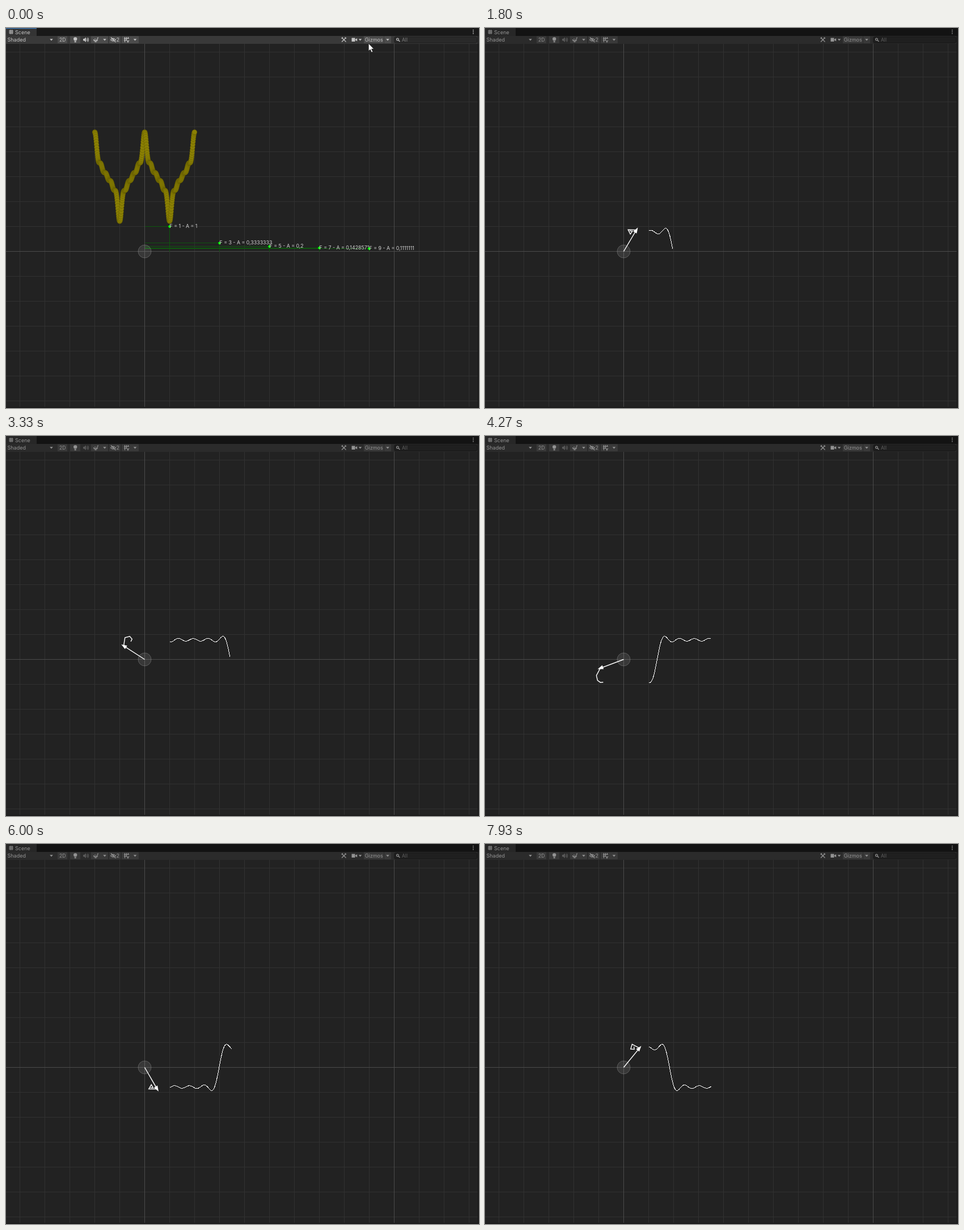
Recreate the animation shown at these times as an HTML page. Size 834 by 671 pixels, loop 8000 ms.

```html
<!DOCTYPE html>
<html lang="en">
<head>
<meta charset="utf-8">
<title>Harmonic vectors</title>
<style>
  html, body { margin: 0; width: 100%; height: 100%; overflow: hidden; background: #222; }
  svg { display: block; width: 834px; height: 671px; }
  text { font: 9px Inter, "Open Sans", sans-serif; fill: #c4c4c4; }
  .label { font-size: 8.8px; fill: #d2d2d2; }
  .crisp { shape-rendering: crispEdges; }
  .on { fill: #4c4c4c; }
  .icon { fill: none; stroke: #c4c4c4; stroke-width: 1.2; }
  .solid { fill: #c4c4c4; }
  .white { fill: none; stroke: #fff; }
</style>
</head>
<body>
<svg viewBox="0 0 834 671">
  <rect width="834" height="671" fill="#222"/>
  <g class="crisp" fill="none">
    <path id="grid" stroke="#313131"/>
    <path d="M244.5 28V669M684.5 28V669M0 394.5H832" stroke="#4b4b4b"/>
  </g>

  <g id="editView">
    <path id="guides" class="crisp" fill="none" stroke="#0f560f"/>
    <g id="wave" fill="#8b8004" stroke="#5b5300" stroke-opacity=".55" stroke-width=".8"></g>
    <g id="harmonics"></g>
  </g>

  <circle cx="244.5" cy="394.5" r="11.5" fill="#fff" fill-opacity=".1" stroke="#fff" stroke-opacity=".2"/>

  <g id="playView">
    <polyline id="trail" class="white crisp"/>
    <polyline id="chain" class="white" stroke-width="1.4"/>
    <path id="head" d="M49 0L39 -3.6V3.6Z" fill="#fff"/>
  </g>

  <g id="chrome">
    <rect width="834" height="14" fill="#191919"/>
    <rect width="54" height="14" fill="#343434"/>
    <rect id="focus" width="54" height="1.2" fill="#3a79bb"/>
    <path class="icon" stroke-width="1" d="M7.5 3V11M10.5 3V11M5 5.5H13M5 8.5H13"/>
    <text x="16" y="10.7">Scene</text>
    <path class="solid" d="M823 3h1.6v1.6h-1.6zM823 6h1.6v1.6h-1.6zM823 9h1.6v1.6h-1.6z"/>

    <rect y="14" width="834" height="14" fill="#393939"/>
    <path class="on" d="M91 14.5h17v12.500h-17zM113 14.500h18v12.500h-18zM150 14.500h30v12.500h-30zM182 14.500h20v12.500h-20zM204 14.500h30v12.500h-30zM631 14.500h35v12.500h-35zM667 14.500h12v12.500h-12z"/>
    <text x="2.500" y="24.200">Shaded</text>
    <text x="94" y="24" style="font-size:8.500px">2D</text>
    <g id="carets" class="solid"></g>
    <path class="solid" d="M119 19.500a3 3 0 0 1 6.400 0q0 1.500-1.600 3h-3.200q-1.600-1.500-1.600-3zM120.700 23.200h3v2h-3z"/>
    <g id="speaker">
      <path class="solid" d="M136 19h2l3-2.500v8.500l-3-2.500h-2z"/>
      <path class="icon" stroke-width="1" d="M142.500 18.500q1.500 2.200 0 4.500M144 17q2.600 3.700 0 7.500"/>
    </g>
    <path class="solid" d="M154 20l4 2 4-2v1.800l-4 2.200-4-2.200zM156 18.500l3 1.500 2.500-1.300-1-1 2.300-1.700-.5 3-3.300 1.600-3-1.200zM154 23l4 1.600 4-1.600-4 2.600z"/>
    <path class="icon" d="M184.500 20.800q4-5 9 0q-4.500 4.500-9 0M185 16.500l8.500 8.500"/>
    <circle class="solid" cx="189" cy="20.700" r="1.400"/>
    <text x="194.500" y="24.200">2</text>
    <path class="icon" stroke-width="1" d="M209.500 16V25M212.500 16V21M208 18.500H217M208 21.500H213M215.500 16V19M213 22l2 2 2-2M215 24v2"/>
    <path class="icon" stroke-width="1.600" d="M592 17l7.500 7.500M599.500 17l-7.500 7.500M591.500 18.500l2.500-2M597.500 16.500l2.500 2"/>
    <path class="solid" d="M609.500 17.500h6v6.500h-6zM616 20l3.200-2v5.500l-3.200-2z"/>
    <text x="632.800" y="24.200">Gizmos</text>
    <rect x="685" y="15.500" width="145.500" height="11" rx="2.500" fill="#292929" stroke="#1f1f1f"/>
    <circle class="icon" cx="690.500" cy="20" r="1.900"/>
    <path class="icon" d="M692 21.500l2.500 2.500"/>
    <text x="698" y="24" style="fill:#7c7c7c;font-size:8.500px">All</text>
    <path d="M832.500 14V671M0 670H834" stroke="#191919" stroke-width="1.500"/>
  </g>
  <rect id="tint" width="834" height="28" fill="#000" fill-opacity=".25"/>
  <path id="cursor" d="M0 0V13.300L3 10.600L5.200 15.600L7.400 14.700L5.200 9.800H9.200Z" fill="#fff" stroke="#111" stroke-width=".6"/>
</svg>
<script>
const LOOP = 8000, STEP = 200 / 3;
const UNIT = 44, OX = 244.5, OY = 394.5;
const PLAY_AT = 666, START = 0.765, FIRST = 0.02;
const TRAIL_SPEED = 41.7, TRAIL_LIFE = 2.64;
const ODDS = [1, 3, 5, 7, 9];

const el = id => document.getElementById(id);
const show = (id, on) => el(id).setAttribute('visibility', on ? 'visible' : 'hidden');
const sum = (fn, angle) => ODDS.reduce((total, k) => total + fn(k * angle) / k, 0);
const point = (x, y) => x.toFixed(2) + ',' + y.toFixed(2);

function buildScene() {
  let grid = '';
  for (let x = 24.5; x < 832; x += UNIT) grid += `M${x} 28V669`;
  for (let y = 42.5; y < 669; y += UNIT) grid += `M0 ${y}H832`;
  el('grid').setAttribute('d', grid);

  let dots = '';
  for (let i = -200; i <= 200; i++) {
    const x = i / 100;
    const y = OY - UNIT * (3 + sum(Math.cos, Math.PI * x));
    dots += `<circle cx="${OX + x * UNIT}" cy="${y.toFixed(2)}" r="4.3"/>`;
  }
  el('wave').innerHTML = dots;

  let guides = '', labels = '';
  for (const k of ODDS) {
    const x = OX + k * UNIT, y = OY - UNIT / k;
    const amplitude = String(+(1 / k).toFixed(7)).replace('.', ',');
    guides += `M${OX} ${y}H${x}V${OY}`;
    labels += `<circle cx="${x}" cy="${y}" r="2.3" fill="#0f0"/>` +
      `<text class="label" x="${x}" y="${y + 2.5}">F = ${k} - A = ${amplitude}</text>`;
  }
  el('guides').setAttribute('d', guides);
  el('harmonics').innerHTML = labels;

  el('carets').innerHTML = [80, 174, 227.5, 624.5, 673]
    .map(x => `<path d="M${x - 2.8} 19.200h5.600l-2.800 3.400z"/>`).join('');
}

function drawVectors(angle) {
  let x = OX, y = OY;
  const joints = [point(x, y)];
  for (const k of ODDS) {
    x += UNIT * Math.cos(k * angle) / k;
    y -= UNIT * Math.sin(k * angle) / k;
    joints.push(point(x, y));
  }
  el('chain').setAttribute('points', joints.join(' '));
  el('head').setAttribute('transform', `translate(${OX} ${OY}) rotate(${-angle * 180 / Math.PI})`);

  const span = Math.min(angle - FIRST, TRAIL_LIFE);
  const count = Math.ceil(span * 60);
  const trail = [];
  for (let i = 0; i <= count; i++) {
    const age = count ? span * i / count : 0;
    trail.push(point(OX + UNIT + age * TRAIL_SPEED, OY - UNIT * sum(Math.sin, angle - age)));
  }
  el('trail').setAttribute('points', trail.join(' '));
}

function render(now) {
  // The small lead absorbs the rounding of step times to 10 ms.
  const step = Math.floor((now % LOOP + 4) / STEP);
  const time = step * STEP;
  const playing = time > PLAY_AT;
  show('editView', !playing);
  show('focus', !playing);
  show('playView', playing);
  show('tint', playing);
  el('speaker').setAttribute('opacity', playing ? 0.45 : 1);
  show('cursor', step < 2);
  el('cursor').setAttribute('transform', step ? 'translate(638.5 19.5)' : 'translate(639.3 27.3)');
  if (playing) drawVectors(Math.max(FIRST, time / 1000 - START));
  requestAnimationFrame(render);
}

buildScene();
requestAnimationFrame(render);
</script>
</body>
</html>
```
